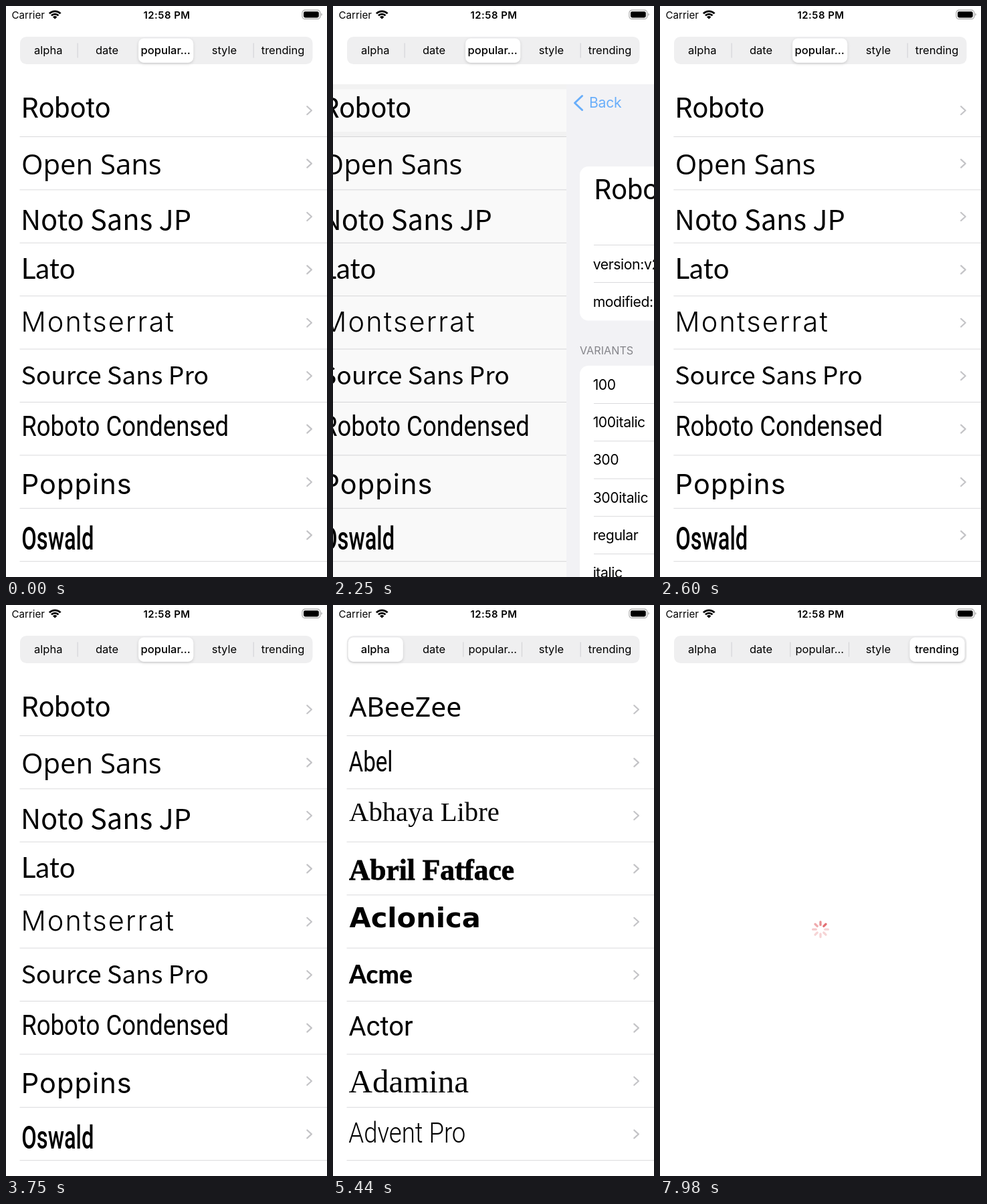
Write an HTML page that moves like this. It is 480 by 854 pixels and loops after 8 s.

```html
<!DOCTYPE html>
<html lang="en">
<head>
<meta charset="utf-8">
<title>Font browser</title>
<style>
  html, body { margin: 0; width: 100%; height: 100%; overflow: hidden; background: #fff; }
  svg { display: block; width: 480px; height: 854px; }
  text { white-space: pre; }
</style>
</head>
<body>
<svg id="stage" viewBox="0 0 480 854" xmlns="http://www.w3.org/2000/svg">
  <defs>
    <clipPath id="body"><rect y="117" width="480" height="737"/></clipPath>
    <filter id="shadow" x="-20%" y="-30%" width="140%" height="180%">
      <feDropShadow dx="0" dy="1.6" stdDeviation="2" flood-opacity=".16"/>
    </filter>
  </defs>
  <rect width="480" height="854" fill="#fff"/>
</svg>
<script>
const LOOP = 8000;
const UI = "Inter, 'Liberation Sans', sans-serif";
const ROBOTO = "Roboto, sans-serif";
const OPEN = "'Open Sans', sans-serif";
const NOTO = "'Noto Sans', sans-serif";
const CJK = "'Noto Sans CJK JP', 'Noto Sans CJK', 'Noto Sans', sans-serif";
const LATO = "Lato, sans-serif";
const SERIF = "'Liberation Serif', serif";
const DEJAVU = "'DejaVu Sans', sans-serif";
const ROW = 79.4;

const stage = document.getElementById('stage');
const clamp = v => Math.max(0, Math.min(1, v));
const ease = v => 1 - Math.pow(1 - clamp(v), 3);

function add(parent, tag, attrs = {}, content) {
  const node = document.createElementNS('http://www.w3.org/2000/svg', tag);
  set(node, attrs);
  if (content !== undefined) node.textContent = content;
  parent.appendChild(node);
  return node;
}
function set(node, attrs) {
  for (const key in attrs) node.setAttribute(key, attrs[key]);
}
function show(node, on) {
  node.setAttribute('display', on ? 'inline' : 'none');
}
function label(parent, content, x, y, size, family = UI, attrs = {}) {
  return add(parent, 'text', { x, y, 'font-size': size, 'font-family': family, ...attrs }, content);
}
function line(parent, x1, x2, y, color = '#dadadc') {
  add(parent, 'path', { d: `M${x1} ${y}H${x2}`, stroke: color, 'stroke-width': 1 });
}

// Each face: name, family, size, x, baseline, extra attributes, condensing factor.
const popular = [
  ['Roboto', ROBOTO, 41.6, 23, 167.3],
  ['Open Sans', OPEN, 41.8, 22.9, 252],
  ['Noto Sans JP', CJK, 41.6, 22, 335],
  ['Lato', LATO, 42, 22.7, 408],
  ['Montserrat', UI, 41.4, 22.4, 487, { 'font-weight': 300, 'letter-spacing': 2.2 }],
  ['Source Sans Pro', CJK, 37.3, 22.4, 566.3],
  ['Roboto Condensed', ROBOTO, 42, 23.2, 643, {}, .87],
  ['Poppins', UI, 41.5, 22.7, 730, { 'letter-spacing': 1.1 }],
  ['Oswald', ROBOTO, 48, 23.3, 813, { 'font-weight': 500 }, .68]
];
const alpha = [
  ['ABeeZee', NOTO, 40.8, 24.2, 167],
  ['Abel', ROBOTO, 42, 23.5, 249, { 'font-weight': 400 }, .79],
  ['Abhaya Libre', SERIF, 40.7, 24, 323],
  ['Abril Fatface', SERIF, 43.4, 24, 410.5, { 'font-weight': 700, stroke: '#000', 'stroke-width': .8 }],
  ['Aclonica', DEJAVU, 41.6, 24.5, 481.5, { 'font-weight': 700 }],
  ['Acme', LATO, 37.2, 24, 566, { 'font-weight': 800 }],
  ['Actor', ROBOTO, 40, 23.5, 644],
  ['Adamina', SERIF, 49, 23.5, 729],
  ['Advent Pro', ROBOTO, 42, 23.3, 804, { 'font-weight': 300 }, .87],
  ['Aguafina Script', SERIF, 36, 27, 874, { 'font-style': 'italic' }]
];

function faceText(parent, [name, family, size, x, y, attrs = {}, condense = 1]) {
  return label(parent, name, 0, 0, size, family,
    { ...attrs, transform: `translate(${x} ${y}) scale(${condense} 1)` });
}
function buildList(parent, faces) {
  const group = add(parent, 'g');
  for (let i = 0; i < 9; i++) {
    line(group, 20.5, 480, 195.5 + i * ROW);
    const y = 156.2 + i * ROW;
    add(group, 'path', {
      d: `M450.3 ${y - 6}l6.6 6l-6.6 6`, fill: 'none', stroke: '#c4c4c7', 'stroke-width': 2.2,
      'stroke-linecap': 'round', 'stroke-linejoin': 'round'
    });
  }
  return { group, faces: faces.map(face => faceText(group, face)) };
}

const main = add(stage, 'g', { 'clip-path': 'url(#body)' });
const popularList = buildList(main, popular);
const alphaList = buildList(main, alpha);
const plainNames = alpha.slice(0, 9).map((face, i) =>
  label(alphaList.group, face[0], 24, 164 + i * ROW, 21.2, UI, { 'letter-spacing': -.4 }));

const rowGlow = add(main, 'path', { d: 'M0 117H480V124.5H0ZM0 188H480V195H0Z', fill: '#000', 'fill-opacity': .03 });
const dim = add(main, 'rect', { y: 117, width: 480, height: 737 });

// Detail page
const page = add(main, 'g');
add(page, 'rect', { y: 117, width: 480, height: 737, fill: '#f2f2f5' });
const back = add(page, 'g', { fill: '#007aff' });
add(back, 'path', {
  d: 'M23.5 134.5L12.5 145L23.5 155.5', fill: 'none', stroke: '#007aff', 'stroke-width': 3,
  'stroke-linecap': 'round', 'stroke-linejoin': 'round'
});
label(back, 'Back', 34, 152.3, 21.2, UI, { 'letter-spacing': -.3 });

function card(y, height) {
  add(page, 'rect', { x: 20, y, width: 440, height, rx: 12.8, fill: '#fff' });
}
function cell(content, center) {
  label(page, content, 39.6, center + 7.6, 21.2, UI, { 'letter-spacing': -.4 });
}
card(240, 230.5);
faceText(page, ['Roboto', ROBOTO, 41.6, 41.5, 289]);
line(page, 41, 460, 357.5);
cell('version:v20', 386);
line(page, 41, 460, 413.5);
cell('modified:2019-07-24', 442.3);
label(page, 'VARIANTS', 20, 521.3, 16.2, UI, { fill: '#85858a' });
card(538, 400);
['100', '100italic', '300', '300italic', 'regular', 'italic'].forEach((name, i) => {
  cell(name, 566.2 + i * 56.25);
  line(page, 41, 460, 594.5 + i * 56.25);
});

// Spinner
const spinner = add(stage, 'g', { stroke: '#df575c', 'stroke-width': 3.3, 'stroke-linecap': 'round' });
const blades = Array.from({ length: 8 }, (_, i) =>
  add(spinner, 'path', { d: 'M0 -6.8V-11.3', transform: `translate(240 485.2) rotate(${i * 45})` }));

// Status bar
label(stage, 'Carrier', 8.5, 18.6, 15.1);
label(stage, '12:58 PM', 240.5, 18.6, 14.9, UI, { 'text-anchor': 'middle', 'font-weight': 600, 'letter-spacing': .5 });
function wifiArc(r) {
  const k = r * Math.SQRT1_2;
  add(stage, 'path', {
    d: `M${73.2 - k} ${19.6 - k}A${r} ${r} 0 0 1 ${73.2 + k} ${19.6 - k}`,
    fill: 'none', stroke: '#000', 'stroke-width': 2.7
  });
}
wifiArc(11.8);
wifiArc(7.5);
add(stage, 'path', { d: 'M73.2 19.6L70 16.4A4.5 4.5 0 0 1 76.4 16.4Z' });
add(stage, 'rect', { x: 443, y: 6.2, width: 26.8, height: 13.2, rx: 4, fill: 'none', stroke: '#a6a6a6', 'stroke-width': 1.2 });
add(stage, 'rect', { x: 445, y: 8.2, width: 22.8, height: 9.2, rx: 2.4 });
add(stage, 'path', { d: 'M471.3 10.6Q474.4 12.8 471.3 15Z', fill: '#a6a6a6' });

// Segmented control
const PITCH = 87.7;
add(stage, 'rect', { x: 21, y: 46, width: 437.5, height: 41, rx: 9.5, fill: '#efeff0' });
const ticks = [1, 2, 3, 4].map(i =>
  add(stage, 'path', { d: `M${19.4 + i * PITCH} 55.5V77.5`, stroke: '#d5d5d8', 'stroke-width': 1.2 }));
const thumb = add(stage, 'rect', { y: 48.5, width: 82, height: 36.2, rx: 8, fill: '#fff', filter: 'url(#shadow)' });
const tabs = ['alpha', 'date', 'popular…', 'style', 'trending'].map((name, i) =>
  label(stage, name, 63.3 + i * PITCH, 72.4, 16.5, UI, { 'text-anchor': 'middle' }));

const switches = [{ start: 3750, from: 2, to: 0 }, { start: 7000, from: 0, to: 4 }];

function pageX(t) {
  if (t < 500 || t >= 2660) return 480;
  if (t < 2250) return t < 620 ? 14 * Math.exp(-(t - 500) * .035) : 0;
  return 480 - 133 * Math.exp(-(t - 2250) * .0155);
}

function drawTabs(t) {
  const change = t < 7000 ? switches[0] : switches[1];
  const u = t - change.start;
  const pos = change.from + (change.to - change.from) * ease((u - 130) / 400);
  const selected = u < 150 ? change.from : change.to;
  set(thumb, { x: 22.7 + pos * PITCH });
  ticks.forEach((tick, i) => set(tick, { opacity: clamp((Math.abs(i + .5 - pos) - .5) * 2) }));
  const pressed = 1 - .7 * clamp(u / 110) * (1 - clamp((u - 130) / 120));
  tabs.forEach((tab, i) => set(tab, {
    'font-weight': i === selected ? 550 : 400,
    opacity: i === change.to ? pressed : 1
  }));
  return u;
}

function drawSpinner(u) {
  const lead = (u - 790) / 125 + 80;
  blades.forEach((blade, i) => {
    const lag = (lead - i) % 8;
    set(blade, { opacity: Math.max(.25, .95 - lag * .18) });
  });
}

function draw(t) {
  const u = drawTabs(t);
  const popularOn = t < 3950;
  const alphaOn = t >= 4800 && t < 7200;
  show(popularList.group, popularOn);
  show(alphaList.group, alphaOn);
  show(spinner, !popularOn && !alphaOn);
  drawSpinner(u);

  // Custom faces replace the plain names once loaded.
  const half = t >= 5440, full = t >= 5490;
  alphaList.faces.forEach((face, i) => show(face, i < 9 ? half : full));
  plainNames.forEach(name => show(name, !half));

  const x = pageX(t), p = x / 480;
  const covered = x < 480;
  set(popularList.group, { transform: `translate(${-.3 * (480 - x)} 0)` });
  set(page, { transform: `translate(${x} 0)` });
  set(back, { opacity: 1 - .6 * p });
  set(dim, { opacity: .08 * (1 - p) });
  set(rowGlow, { opacity: clamp((1 - p) / .28) });
  [page, dim, rowGlow].forEach(node => show(node, covered));
}

const began = performance.now();
function tick() {
  draw((performance.now() - began) % LOOP);
  requestAnimationFrame(tick);
}
tick();
</script>
</body>
</html>
```
